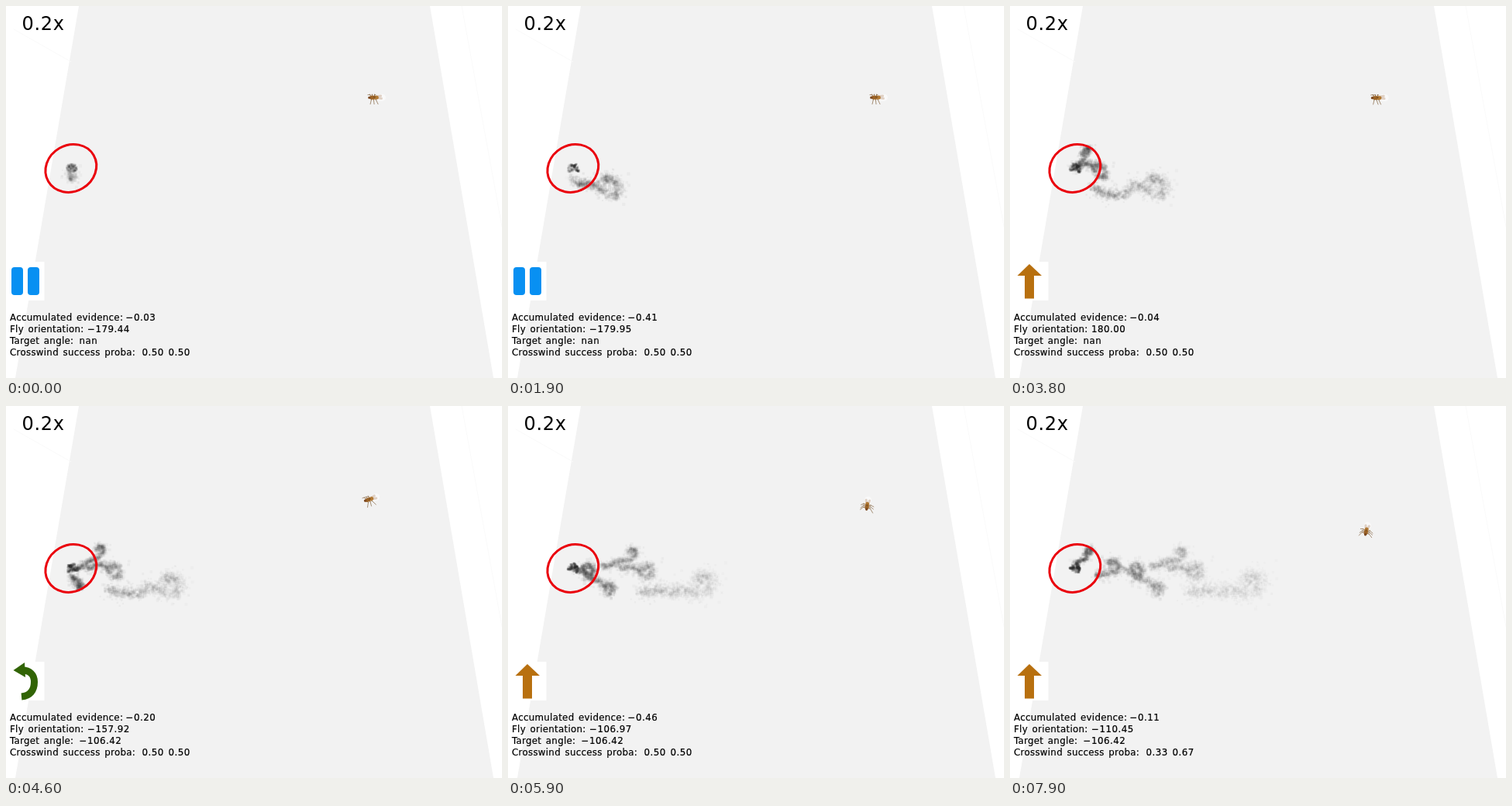
Animation, 640 px wide and 480 px high, one loop 8000 ms. Source, as an HTML page with a canvas:

```html
<!DOCTYPE html>
<html lang="en">
<head>
<meta charset="utf-8">
<title>Fly and plume</title>
<style>
html, body { margin: 0; width: 100%; height: 100%; overflow: hidden; background: #fff; }
canvas, svg { position: absolute; left: 0; top: 0; width: 640px; height: 480px; }
text {
  font: 11.8px "DejaVu Sans", sans-serif; letter-spacing: .3px; word-spacing: 1.5px;
  fill: #000; stroke: #000; stroke-width: .2px;
}
text.value { letter-spacing: .5px; }
text.speed { font-size: 24px; letter-spacing: .7px; stroke: none; }
</style>
</head>
<body>
<canvas id="stage" width="640" height="480"></canvas>
<svg viewBox="0 0 640 480">
  <ellipse cx="83.8" cy="209.4" rx="33.8" ry="29.9" transform="rotate(-30 83.8 209.4)" fill="none" stroke="#ea000c" stroke-width="3"/>
  <rect y="330" width="49.5" height="50" fill="#fff"/>
  <g id="pause" fill="#0890f2">
    <rect x="7" y="337" width="15" height="36" rx="4"/>
    <rect x="28" y="337" width="15" height="36" rx="4"/>
  </g>
  <g id="turn">
    <path d="M9.500 341L24 331L25 350Z" fill="#316405"/>
    <path d="M21 341C31 341 36.500 347 36.500 356C36.500 367 31 374 20 375" fill="none" stroke="#316405" stroke-width="9"/>
  </g>
  <path id="walk" d="M25 333L41 348H31V377.500H19V348H9.500Z" fill="#b8700f"/>
  <text class="speed" x="20.5" y="31">0.2x</text>
  <text x="5" y="405.500">Accumulated evidence:</text>
  <text x="5" y="420.500">Fly orientation:</text>
  <text x="5" y="435.500">Target angle:</text>
  <text x="5" y="450.500">Crosswind success proba:</text>
  <text class="value" id="evidence" x="154.500" y="405.500"></text>
  <text class="value" id="heading" x="105" y="420.500"></text>
  <text class="value" id="target" x="94.500" y="435.500"></text>
  <text class="value" id="proba" x="175.500" y="450.500"></text>
</svg>
<script>
const LOOP = 8000, STEP = 100;
const WALK = 3600, TURN = 4180, STRAIGHT = 5580, SECOND = 7350;
const TARGET = -106.42;
const SOURCE = { x: 85, y: 209 }, WIND = 30, REF = 5.9;
const $ = id => document.getElementById(id);
const ctx = $("stage").getContext("2d");
const clamp = v => Math.max(0, Math.min(1, v));
const ramp = (t, from, to) => clamp((t - from) / (to - from));
const mix = (a, b, f) => a + (b - a) * f;

function rng(seed) {
  return () => {
    seed = (seed + 0x6d2b79f5) | 0;
    let v = Math.imul(seed ^ seed >>> 15, 1 | seed);
    v = v + Math.imul(v ^ v >>> 7, 61 | v) ^ v;
    return ((v ^ v >>> 14) >>> 0) / 4294967296;
  };
}
const rand = rng(41);
const bell = () => rand() + rand() + rand() - 1.5;

// Eddies at REF seconds: centre x, y, radius, tail length, tail start y.
const eddies = [
  [252, 227, 13, 82, 239], [179, 212, 9, 38, 206], [160, 189, 6, 40, 205], [129, 235, 8, 32, 218],
  [103, 211, 8, 20, 209], [72, 206, 9, 22, 216], [40, 186, 6, 45, 190]
];

// A tail that runs downwind and rolls up into a shrinking spiral.
function hook([x, y, r, tail, startY], u) {
  const split = tail / (tail + 4 * r);
  if (u < split) {
    const f = u / split;
    return [x - tail * (1 - f), mix(startY, y + r, f * f) + 2 * Math.sin(f * tail / 5)];
  }
  const f = (u - split) / (1 - split), a = mix(Math.PI / 2, -3.2, f), q = r * (1 - .5 * f);
  return [x + q * Math.cos(a), y + q * Math.sin(a)];
}

const smoke = eddies.flatMap(e => {
  const [, , r, tail] = e, width = 1.5 + r * .35;
  return Array.from({ length: 8 * (tail + 4 * r) }, () => {
    const [x, y] = hook(e, rand());
    const w = width * (rand() < .25 ? 2.2 : 1);
    return { x, y, jx: bell() * w, jy: bell() * w, size: 2 + rand() * 2.4 };
  });
});
const puff = Array.from({ length: 200 }, () => {
  const a = rand() * 2 * Math.PI, r = Math.sqrt(rand());
  return { x: Math.cos(a) * r * 7, y: Math.sin(a) * r * 5.5, a, size: 1.8 + rand() * 1.6 };
});

function dot(x, y, size, alpha) {
  ctx.globalAlpha = alpha;
  ctx.fillRect(x - size / 2, y - size / 2, size, size);
}

function line(x1, y1, x2, y2) {
  ctx.beginPath();
  ctx.moveTo(x1, y1);
  ctx.lineTo(x2, y2);
  ctx.stroke();
}

function drawFloor() {
  ctx.fillStyle = "#fff";
  ctx.fillRect(0, 0, 640, 480);
  ctx.fillStyle = "#f2f2f2";
  ctx.beginPath();
  [[94, 0], [547, 0], [629, 480], [12, 480]].forEach(p => ctx.lineTo(...p));
  ctx.fill();
  ctx.strokeStyle = "#fafafa";
  ctx.lineWidth = 1;
  line(588, 0, 640, 285);
  line(10, 30, 84, 72);
}

function drawSmoke(s) {
  const sway = 8 * clamp((REF - s) / 2.5);
  ctx.fillStyle = "#303030";
  for (const q of smoke) {
    const x = q.x + WIND * (s - REF), age = (x - SOURCE.x + 5) / WIND;
    if (age < 0) continue;
    const near = clamp((x - 70) / 35), spread = .8 + .1 * age;
    const bend = sway * Math.sin((q.x - 181) / 65 * 2 * Math.PI);
    const y = mix(SOURCE.y, q.y + bend, near);
    dot(x + q.jx * spread, y + q.jy * spread, q.size, .042 * clamp(age * 3) / (.5 + .25 * age));
  }
  const dark = .07 + .011 * s, stir = Math.min(1.5, s);
  for (const q of puff) {
    dot(SOURCE.x + q.x + stir * Math.sin(s * 3 + q.a * 2),
        SOURCE.y + q.y + stir * Math.cos(s * 2.6 + q.a * 3), q.size, dark);
  }
  ctx.globalAlpha = 1;
}

function flyPose(t) {
  const first = ramp(t, WALK, TURN), turn = ramp(t, TURN, STRAIGHT), second = ramp(t, STRAIGHT, LOOP);
  const settle = .56 * Math.exp(-t / 780);
  const weave = 8.94 * Math.sin((t - 5921) / 2138 * 2 * Math.PI) * ramp(t, STRAIGHT, STRAIGHT + 300);
  return {
    x: 475.5 - 4 * first - 7.5 * turn - 4.5 * second,
    y: 120 + first + 4 * turn + 39.5 * second,
    heading: mix(-180, TARGET, turn) + settle + weave
  };
}

function drawFly(t, { x, y, heading }) {
  const a = -heading * Math.PI / 180, c = Math.cos(a), n = Math.sin(a);
  // forward, sideways, up -> screen
  const at = (f, s, u) => {
    const depth = (f * n + s * c) * .75;
    return [x + f * c - s * n + depth * .25, y + depth - u * .6];
  };
  const part = (from, to, width, color) => {
    ctx.strokeStyle = color;
    ctx.lineWidth = width;
    line(...at(...from), ...at(...to));
  };
  ctx.lineCap = "round";
  part([-10, 0, 3], [-7, 0, 3], 9, "rgba(255,255,255,.55)");
  for (const side of [-1, 1]) {
    for (const k of [-1, 0, 1]) {
      const swing = t < WALK ? 0 : 1.4 * Math.sin(t / 55 + (k + side) * 1.6);
      const knee = [2 + k * 3, side * 4.5, 4], foot = [2 + k * 5 + swing, side * 8, -1];
      part([2 + k * 2, 0, 3], knee, .9, "#80592f");
      part(knee, foot, .8, "#927657");
    }
    part([-2, side, 4], [-8.5, side * 2.2, 4], 3, "rgba(216,198,182,.8)");
  }
  part([-3, 0, 3], [1, 0, 3], 4.8, "#b27a34");
  part([2, 0, 3], [4, 0, 3], 4.8, "#9c6326");
  part([6.5, 0, 3], [6.8, 0, 3], 3.2, "#7c4820");
  part([-.5, 0, 4], [.5, 0, 4], 2, "#805425");
  ctx.lineCap = "butt";
}

const num = v => v.toFixed(2).replace("-", "\u2212");

function drawReadout(t, heading) {
  const reset = t < WALK ? -150 : t < SECOND ? WALK : SECOND;
  const mode = t < WALK ? "pause" : t >= TURN && t < STRAIGHT ? "turn" : "walk";
  for (const id of ["pause", "turn", "walk"]) $(id).style.display = id === mode ? "" : "none";
  $("evidence").textContent = num(-.0002 * (t - reset));
  $("heading").textContent = num(heading < -179.985 ? 180 : heading);
  $("target").textContent = t < TURN ? "nan" : num(TARGET);
  $("proba").textContent = t < SECOND ? "0.50 0.50" : "0.33 0.67";
}

function draw(t) {
  const pose = flyPose(t);
  drawFloor();
  drawSmoke(t / 1000);
  drawFly(t, pose);
  drawReadout(t, pose.heading);
}

const start = performance.now();
let shown = -1;
function tick() {
  const t = Math.floor((performance.now() - start) % LOOP / STEP) * STEP;
  if (t !== shown) draw(shown = t);
  requestAnimationFrame(tick);
}
tick();
</script>
</body>
</html>
```
